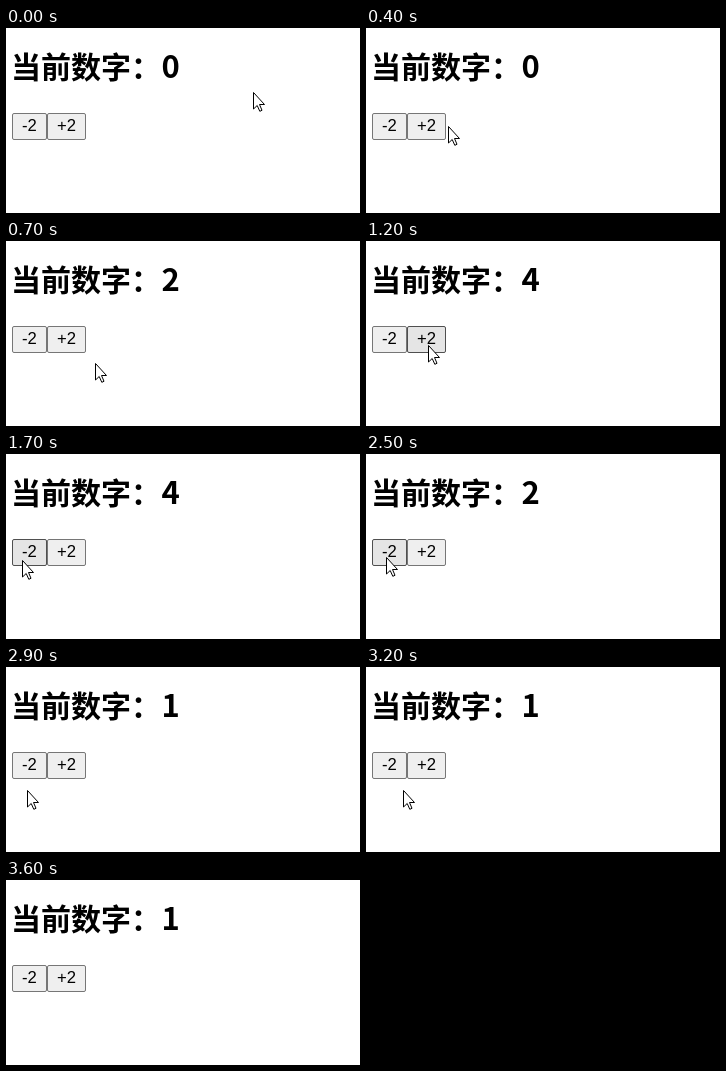
Animation, 354 px wide and 185 px high, one loop 3900 ms. Source, as an HTML page:

```html
<!DOCTYPE html>
<html lang="zh">
<head>
<meta charset="utf-8">
<style>
html, body { margin: 0; width: 100%; height: 100%; overflow: hidden; background: #fff; }
svg { display: block; width: 354px; height: 185px; }
.title { font: bold 30px "Noto Sans CJK SC", "Noto Sans CJK", sans-serif; }
#count { font-size: 31px; }
.btn rect { fill: #efefef; stroke: #767676; }
.btn.hover rect { fill: #e5e5e5; stroke: #4f4f4f; }
.btn text { font: 16.67px "Liberation Sans", Arial, sans-serif; }
</style>
</head>
<body>
<svg viewBox="0 0 354 185">
  <text class="title" x="5" y="50">当前数字：</text>
  <text class="title" id="count" x="155.5" y="50">0</text>
  <g class="btn" id="minus">
    <rect x="6.5" y="85.5" width="34" height="26" rx="1.5"/>
    <text x="16" y="103">-2</text>
  </g>
  <g class="btn" id="plus">
    <rect x="41.5" y="85.5" width="38" height="26" rx="1.5"/>
    <text x="51" y="103">+2</text>
  </g>
  <path id="cursor" d="M.5 .5V17L4.2 13.5L6.8 19.3L9 18.3L6.5 12.5H11.5Z" fill="#fff" stroke="#000"/>
</svg>
<script>
const LOOP = 3900, STEP = 100;
const $ = id => document.getElementById(id);
const count = $("count"), minus = $("minus"), plus = $("plus"), cursor = $("cursor");

// Pointer path; "add" marks a click and its effect on the number
const path = [
  { t: 0, x: 247, y: 64 },
  { t: 100, x: 133, y: 89 },
  { t: 500, x: 72, y: 100, add: 2 },
  { t: 700, x: 89, y: 122 },
  { t: 1000, x: 62, y: 104, add: 2 },
  { t: 1200, x: 62, y: 104 },
  { t: 1400, x: 67, y: 135 },
  { t: 1700, x: 16, y: 106 },
  { t: 2000, x: 18, y: 105, add: -2 },
  { t: 2200, x: 24, y: 129 },
  { t: 2500, x: 20, y: 103 },
  { t: 2700, x: 20, y: 103, add: -1 },
  { t: 3000, x: 21, y: 130 },
  { t: 3200, x: 37, y: 123 },
  { t: 3300, x: 122, y: 152 },
  { t: 3400, x: 400, y: 170 }
];

const smooth = u => u * u * (3 - 2 * u);

function pointer(t) {
  const i = path.findLastIndex(p => p.t <= t);
  const a = path[i], b = path[i + 1];
  if (!b) return a;
  const u = smooth((t - a.t) / (b.t - a.t));
  const mix = (p, q) => Math.round(p + (q - p) * u);
  return { x: mix(a.x, b.x), y: mix(a.y, b.y) };
}

function draw(now) {
  const t = Math.floor(now % LOOP / STEP) * STEP;
  const { x, y } = pointer(t);
  const over = (left, right) => x >= left && x < right && y >= 85 && y < 112;
  count.textContent = path.reduce((sum, p) => sum + (p.t <= t && p.add || 0), 0);
  minus.classList.toggle("hover", over(6, 41));
  plus.classList.toggle("hover", over(41, 80));
  cursor.setAttribute("transform", `translate(${x} ${y})`);
}

const start = performance.now();
function tick() {
  draw(performance.now() - start);
  requestAnimationFrame(tick);
}
tick();
</script>
</body>
</html>
```
